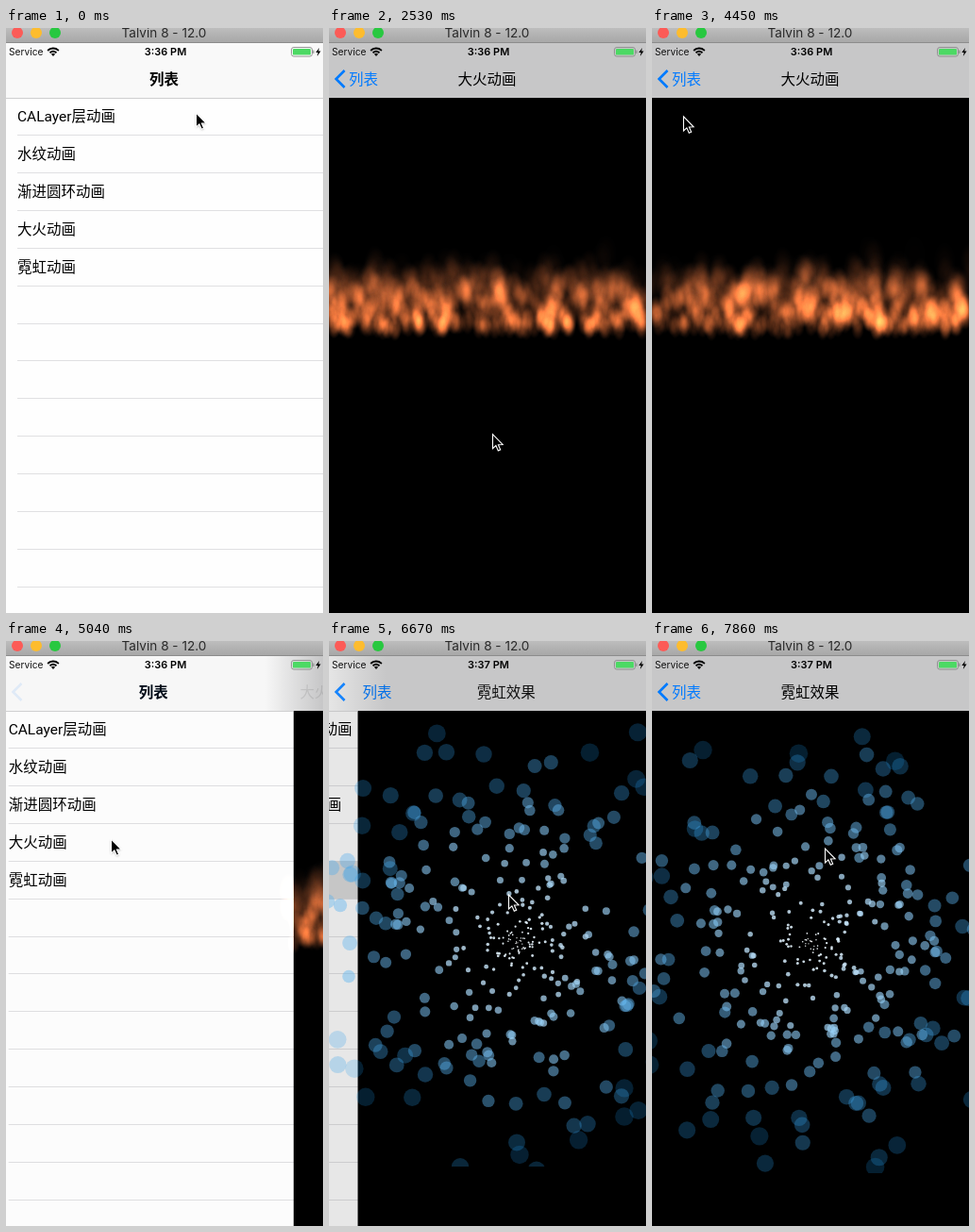
An HTML page with a canvas for the animation above (8 s loop, 336 by 620 pixels).

```html
<!DOCTYPE html>
<html lang="zh-CN">
<head>
<meta charset="utf-8">
<style>
html, body { margin: 0; width: 336px; height: 620px; overflow: hidden; background: #fff; }
canvas { display: block; }
</style>
</head>
<body>
<canvas id="stage" width="336" height="620"></canvas>
<script>
const W = 336, H = 620, LOOP = 8000, STEP = LOOP / 54;
const NAV_BOTTOM = 74, ROW = 39.92;
const CJK = '"Noto Sans CJK SC", "Noto Sans CJK", sans-serif';
const ROWS = ['CALayer层动画', '水纹动画', '渐进圆环动画', '大火动画', '霓虹动画'];
const PUSH_FIRE = 1477, POP = 4788, PUSH_NEON = 6416;
// time, x, y of the pointer tip
const PATH = [
  [0, 201, 90], [600, 104, 351], [1037, 178, 216], [1630, 178, 216],
  [2520, 173, 431], [3556, 99, 202], [4740, 11, 58], [4889, 11, 58],
  [5037, 111, 210], [5926, 185, 261], [6100, 185, 261], [6222, 190, 269],
  [6667, 190, 269], [7852, 183, 220], [LOOP, 183, 220]
];

const ctx = document.getElementById('stage').getContext('2d');
const lerp = (a, b, k) => a + (b - a) * k;

function rand(a, b) {
  const v = Math.sin(a * 127.1 + b * 311.7) * 43758.5453;
  return v - Math.floor(v);
}

function rect(x, y, w, h, fill) {
  ctx.fillStyle = fill;
  ctx.fillRect(x, y, w, h);
}

function circle(x, y, r, fill) {
  ctx.fillStyle = fill;
  ctx.beginPath();
  ctx.arc(x, y, r, 0, Math.PI * 2);
  ctx.fill();
}

function poly(points, fill) {
  ctx.beginPath();
  points.forEach(([x, y]) => ctx.lineTo(x, y));
  ctx.closePath();
  ctx.fillStyle = fill;
  ctx.fill();
}

function text(str, x, y, font, fill, align = 'left') {
  ctx.font = font;
  ctx.fillStyle = fill;
  ctx.textAlign = align;
  ctx.fillText(str, x, y);
}

function makeFlame() {
  const c = document.createElement('canvas');
  c.width = c.height = 32;
  const g = c.getContext('2d');
  const glow = g.createRadialGradient(16, 16, 0, 16, 16, 16);
  glow.addColorStop(0, 'rgba(205,100,49,1)');
  glow.addColorStop(0.5, 'rgba(205,100,49,.7)');
  glow.addColorStop(1, 'rgba(205,100,49,0)');
  g.fillStyle = glow;
  g.fillRect(0, 0, 32, 32);
  return c;
}
const flame = makeFlame();

function fire(left, t) {
  ctx.globalCompositeOperation = 'lighter';
  for (let i = 0; i < 520; i++) {
    const life = 0.4 + 0.2 * rand(i, 1);
    const phase = t / 1000 / life + rand(i, 2);
    const n = Math.floor(phase), u = phase - n, age = u * life;
    const speed = 120 + 40 * (rand(i, n + 3) - 0.5);
    const x = left + W * rand(i, n + 40) + speed * age * (rand(i, n + 80) - 0.5) * 0.4;
    const y = 320 - speed * age;
    const s = 0.75 + 0.8 * age;
    ctx.globalAlpha = 0.27 * Math.sqrt(1 - u);
    ctx.drawImage(flame, x - 9 * s, y - 16 * s, 18 * s, 32 * s);
  }
  ctx.globalAlpha = 1;
  ctx.globalCompositeOperation = 'source-over';
}

function neon(left, t) {
  ctx.save();
  ctx.beginPath();
  ctx.rect(0, NAV_BOTTOM, W, (t < 7000 ? 557 : 564) - NAV_BOTTOM);
  ctx.clip();
  for (let i = 0; i < 340; i++) {
    const phase = t / 3000 + rand(i, 5);
    const n = Math.floor(phase), u = phase - n;
    const d = u ** 1.1 * (190 + 75 * rand(i, n + 9));
    const a = Math.PI * 2 * rand(i, n + 21);
    circle(left + 168 + d * Math.cos(a), 319 + d * Math.sin(a), 0.5 + 9.3 * u ** 1.15,
      `rgba(${255 - 230 * u},${255 - 105 * u},${255 - 20 * u},${1 - 0.8 * u})`);
  }
  ctx.restore();
}

function list(p, selected, glow) {
  const x = -0.3 * W * p;
  rect(0, NAV_BOTTOM, W, H, '#fefefe');
  for (let i = 1; i < 14; i++) rect(x + 12, Math.round(73 + ROW * i), W, 1, '#e0e0e2');
  if (selected >= 0) {
    ctx.globalAlpha = glow;
    rect(0, 73.5 + ROW * selected, W, ROW, '#d9d9d9');
    ctx.globalAlpha = 1;
  }
  ROWS.forEach((s, i) => text(s, x + 12, 99.3 + ROW * i, '15.5px Roboto, ' + CJK, '#000'));
  rect(0, NAV_BOTTOM, W, H, `rgba(0,0,0,${0.1 * p})`);
}

function navBar(p, edge, pushing, title) {
  const shade = Math.round(249 - 22 * p);
  const bg = ctx.createLinearGradient(edge - 30, 0, edge + 30, 0);
  bg.addColorStop(0, `rgb(${shade},${shade},${shade})`);
  bg.addColorStop(1, '#c7c7c8');
  rect(0, 16, W, NAV_BOTTOM - 16, p < 0.005 ? '#f9f9f9' : p > 0.995 ? '#c7c7c8' : bg);
  rect(0, NAV_BOTTOM, edge, 0.7, '#bcbcbe');

  const back = lerp(36.5, 167.5, (1 - p) ** 0.92);
  const weight = p < 0.5 ? 700 : 400;
  text('列表', back, 60, `${weight} 15.5px ${CJK}`, `rgb(0,${122 * p},${255 * p})`, 'center');
  ctx.globalAlpha = p;
  text(title, 167.5 + (pushing ? 222 : 193) * (1 - p), 60, `500 15.5px ${CJK}`, '#000', 'center');
  ctx.strokeStyle = '#007aff';
  ctx.lineWidth = 2.6;
  ctx.beginPath();
  ctx.moveTo(16.5, 45);
  ctx.lineTo(7.5, 54);
  ctx.lineTo(16.5, 63);
  ctx.stroke();
  ctx.globalAlpha = 1;
}

function statusBar(clock) {
  text('Service', 3, 29, '10.2px Inter, sans-serif', '#111');
  ctx.strokeStyle = '#000';
  ctx.lineWidth = 1.9;
  [4.7, 8].forEach(r => {
    ctx.beginPath();
    ctx.arc(50, 29.5, r, -Math.PI * 0.76, -Math.PI * 0.24);
    ctx.stroke();
  });
  poly([[50, 30], [47.8, 27.6], [50, 26.7], [52.2, 27.6]], '#000');
  text(clock, 169, 29.3, '600 11px Inter, sans-serif', '#000', 'center');
  ctx.strokeStyle = '#8c8c8c';
  ctx.lineWidth = 0.9;
  ctx.beginPath();
  ctx.roundRect(302.5, 20.5, 22, 9.6, 2.5);
  ctx.stroke();
  ctx.fillStyle = '#4cd964';
  ctx.beginPath();
  ctx.roundRect(304, 22, 19, 6.6, 1.2);
  ctx.fill();
  rect(325.3, 23.6, 1.2, 3.4, '#8c8c8c');
  poly([[332, 21], [328.3, 26], [330.7, 26], [329.8, 30], [333.6, 24.6], [331.2, 24.6]], '#000');
}

function windowBar() {
  const bg = ctx.createLinearGradient(0, 0, 0, 16);
  bg.addColorStop(0, '#bdbdbd');
  bg.addColorStop(1, '#a6a6a6');
  rect(0, 0, W, 16, bg);
  rect(0, 15, W, 1, '#8c8c8c');
  ['#fc5b57', '#fdbc2e', '#28c840'].forEach((c, i) => circle(12 + 20 * i, 5, 6, c));
  text('Talvin 8 - 12.0', 167.5, 10.2, '13.6px Inter, sans-serif', '#2a2a2a', 'center');
}

function pointer(t) {
  const i = PATH.findIndex(k => k[0] > t);
  const [t0, x0, y0] = PATH[i - 1], [t1, x1, y1] = PATH[i];
  const k = (t - t0) / (t1 - t0);
  ctx.save();
  ctx.translate(lerp(x0, x1, k) + 0.5, lerp(y0, y1, k));
  ctx.shadowColor = 'rgba(0,0,0,.35)';
  ctx.shadowBlur = 2;
  ctx.shadowOffsetY = 1;
  poly([[0, 0], [0, 15], [3.4, 11.9], [5.8, 17.3], [8.2, 16.3], [5.9, 11], [10.6, 10.8]], '#000');
  ctx.shadowColor = 'transparent';
  ctx.strokeStyle = '#fff';
  ctx.lineWidth = 1.1;
  ctx.stroke();
  ctx.restore();
}

// Remaining distance of a critically damped slide, 1 to 0
function slide(t, start) {
  const x = 0.016 * Math.max(0, t - start);
  return (1 + x) * Math.exp(-x);
}

function draw(t) {
  const isNeon = t >= PUSH_NEON, popping = t >= POP && !isNeon;
  const p = popping ? slide(t, POP) : 1 - slide(t, isNeon ? PUSH_NEON : PUSH_FIRE);
  const edge = W * (1 - p);
  const selected = isNeon ? 4 : t >= PUSH_FIRE ? 3 : -1;

  list(p, selected, popping ? p * p : 1);
  if (edge < W - 0.5) {
    rect(edge, NAV_BOTTOM, W, H, '#000');
    (isNeon ? neon : fire)(edge, t);
  }
  navBar(p, edge, !popping, isNeon ? '霓虹效果' : '大火动画');
  statusBar(isNeon ? '3:37 PM' : '3:36 PM');
  windowBar();
  pointer(t);
}

function tick(now) {
  const step = Math.floor((now % LOOP) / STEP + 0.08) % 54;
  draw(step * STEP);
  requestAnimationFrame(tick);
}
requestAnimationFrame(tick);
</script>
</body>
</html>
```
